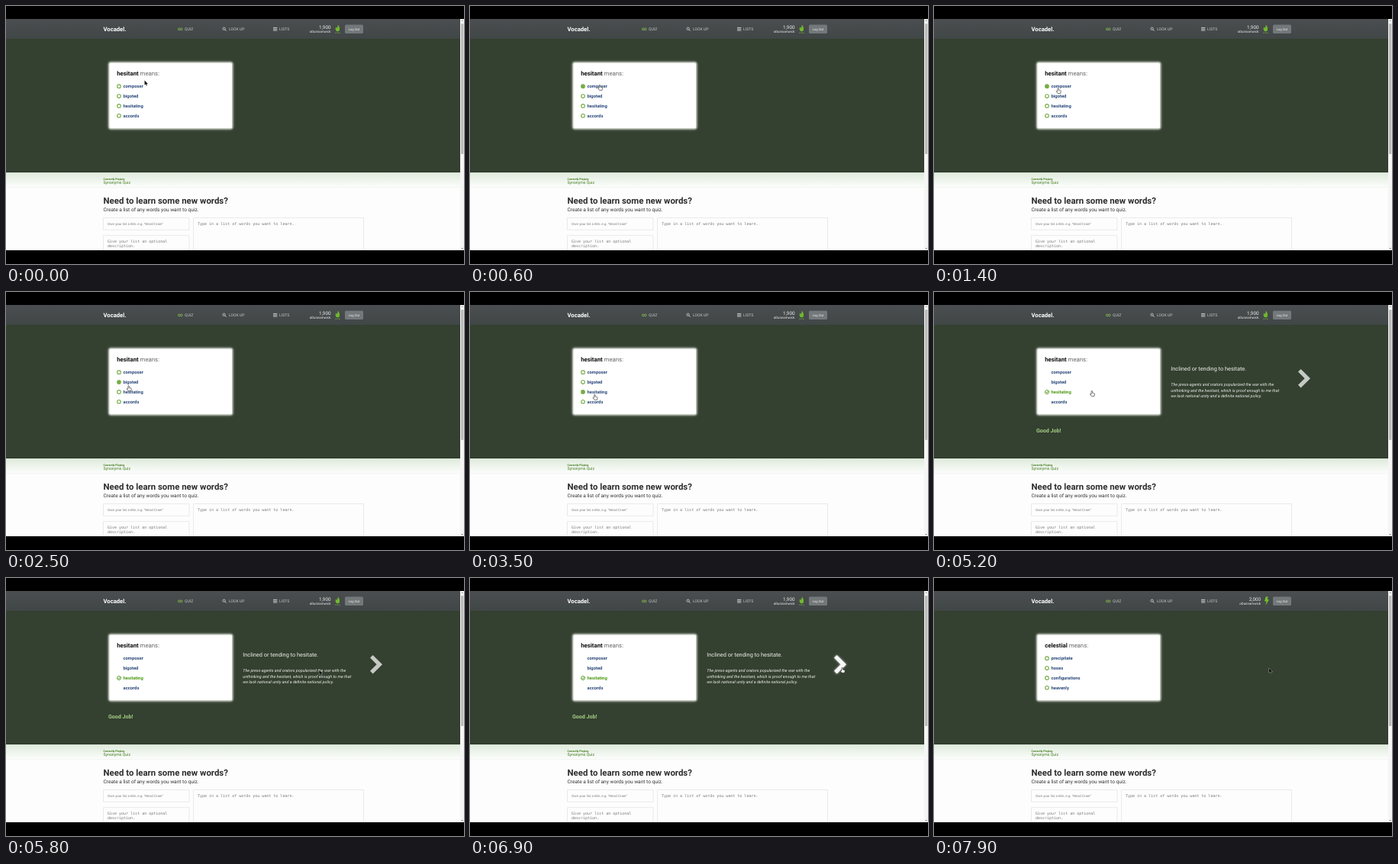
An HTML page for the animation above (8 s loop, 600x338 px).

```html
<!DOCTYPE html>
<html lang="en">
<head>
<meta charset="utf-8">
<title>Vocabulary quiz</title>
<style>
  html, body { margin: 0; height: 100%; overflow: hidden; background: #000; }
  svg { display: block; width: 100vw; height: 100vh; font-family: Roboto, sans-serif; text-rendering: geometricPrecision; }
  .bold { font-weight: 700; }
  .nav { font-size: 5.1px; fill: #c4c8c6; }
  .end { text-anchor: end; }
  .mono { font: 5px "DejaVu Sans Mono", monospace; fill: #777; }
  .line { fill: none; stroke: #dcdedc; stroke-width: .6; }
  .option { font-size: 5.85px; font-weight: 700; }
</style>
</head>
<body>
<svg viewBox="0 0 600 338">
  <defs>
    <linearGradient id="bar" x2="0" y2="1"><stop stop-color="#4a4e50"/><stop offset="1" stop-color="#414647"/></linearGradient>
    <linearGradient id="mist" x2="0" y2="1"><stop stop-color="#dfeadb"/><stop offset="1" stop-color="#fdfefd"/></linearGradient>
    <filter id="glow" x="-50%" y="-50%" width="200%" height="200%"><feDropShadow dx="0" dy="0" stdDeviation="1.6" flood-color="#fff" flood-opacity=".75"/></filter>
  </defs>

  <rect y="17" width="600" height="303" fill="#fdfdfd"/>
  <rect y="17" width="595" height="26" fill="url(#bar)"/>
  <rect y="43" width="595" height="175" fill="#344030"/>
  <rect y="218" width="595" height="20" fill="url(#mist)"/>
  <path d="M0 217.6H595" stroke="#2a3427" stroke-width=".8"/>
  <path d="M0 237.8H595" stroke="#e6ebe4" stroke-width=".6"/>
  <rect x="595" y="17" width="5" height="303" fill="#f5f5f5"/>
  <rect x="596" y="23" width="3.4" height="171" rx="1" fill="#b9bbb9"/>
  <path d="M596.4 19.8L597.7 18.4 599 19.8zM596.4 317L597.7 318.4 599 317z" fill="#777"/>

  <text class="bold" x="127.5" y="32.6" font-size="7.66" fill="#fff">Vocadel.</text>
  <g fill="none" stroke="#7fae4c" stroke-width="1"><circle cx="226.8" cy="30.4" r="1.4"/><circle cx="229.8" cy="30.4" r="1.4"/></g>
  <g fill="none" stroke="#c4c8c6" stroke-width="1">
    <circle cx="285.6" cy="29.7" r="1.6"/><path d="M286.8 30.9L288.6 32.7"/>
    <path d="M350 28.4H355.3M350 30.2H355.3M350 32H355.3"/>
  </g>
  <text class="nav" x="234" y="32.1">QUIZ</text>
  <text class="nav" x="292" y="32.1">LOOK UP</text>
  <text class="nav" x="358" y="32.1">LISTS</text>
  <g id="account" fill="#f0f2f0">
    <text id="score" class="end" x="425.5" y="30.4" font-size="6.3"></text>
    <text class="end" x="425.5" y="35.3" font-size="4.4">oDunnamwick</text>
  </g>
  <g id="flame" fill="#72b72f">
    <path d="M434.8 24.5Q437.8 28 436.9 32Q435.8 33.8 433 33Q430.6 30.5 432.4 27.5L433.2 29Q435 27.5 434.8 24.5z"/>
    <text x="434.3" y="35.8" font-size="2.6" text-anchor="middle">streak</text>
  </g>
  <path id="bolt" d="M434.6 24.6H437.6L436.8 28.2H439L434.4 35.8 435.5 30.6H433z" fill="#72c02a"/>
  <rect x="444" y="24.6" width="24" height="11.4" rx="1.6" fill="#73787a"/>
  <text x="456" y="31.8" font-size="4.16" fill="#eef0ee" text-anchor="middle">Log Out</text>

  <rect x="134.8" y="73.9" width="161.9" height="87" rx="2.4" fill="#fff" stroke="#aab3a6" stroke-width="1.2" filter="url(#glow)"/>
  <text x="145.2" y="91" font-size="7.8" fill="#666"><tspan id="word" class="bold" fill="#111"></tspan> means:</text>
  <g id="options"></g>

  <g id="answer">
    <circle cx="148" cy="131" r="2.5" fill="none" stroke="#4f9717" stroke-width=".9"/>
    <path d="M146.7 130.9L147.8 132.1 149.6 129.8" fill="none" stroke="#4f9717" stroke-width=".9"/>
    <text class="bold" x="134" y="184" font-size="7.1" fill="#a6cf86">Good Job!</text>
    <g fill="#eef1ec">
      <text x="310.3" y="102.8" font-size="7.37">Inclined or tending to hesitate.</text>
      <g font-size="5.4" font-style="italic">
        <text x="310.3" y="122.8">The press-agents and orators popularized the war with the</text>
        <text x="310.3" y="130.6">unthinking and the hesitant, which is proof enough to me that</text>
        <text x="310.3" y="138.4">we lack national unity and a definite national policy.</text>
      </g>
    </g>
    <path id="next" d="M477 104.6L480.6 101 493 113.2 480.6 125.4 477 121.8 485.6 113.2z"/>
  </g>

  <text class="bold" x="127.5" y="227.6" font-size="3.6" fill="#3f7a1c">Currently Playing</text>
  <text x="127.5" y="233" font-size="5.2" fill="#3f7a1c">Synonyms Quiz</text>
  <text class="bold" x="127.5" y="259.2" font-size="11.43" fill="#2d2f2d">Need to learn some new words?</text>
  <text x="127.5" y="269.4" font-size="6.59" fill="#333">Create a list of any words you want to quiz.</text>
  <path class="line" d="M127.5 277.5H240V293.3H127.5zM127.5 320V300.6H240V320M245.5 320V277.5H468.5V320"/>
  <text x="133" y="287" font-size="4.37" fill="#777" font-family="Liberation Sans, sans-serif">Give your list a title, e.g. "Word Cram"</text>
  <text class="mono" x="251" y="287.3">Type in a list of words you want to learn.</text>
  <text class="mono" x="133" y="310.4">Give your list an optional</text>
  <text class="mono" x="133" y="316.2">description.</text>
  <rect y="320" width="600" height="18"/>

  <g id="cursor" stroke-width=".6" stroke-linejoin="round">
    <path id="arrow" d="M0 0V6L1.4 4.8 2.3 6.8 3.3 6.4 2.4 4.5H4.2z" fill="#111" stroke="#e4e6e4" paint-order="stroke"/>
    <path id="hand" d="M-.7 .6a.7 .7 0 0 1 1.4 0V2.6l2 .4q1 .2 .9 1.2L3.2 6.8H-.6L-2.4 4.2q0-1 1.7-.1z" fill="#fff" stroke="#222"/>
  </g>
</svg>
<script>
const LOOP = 8000, ANSWERED = 3700, NEXT_WORD = 7900, ROW = 12.85;
const el = id => document.getElementById(id);
const show = (id, on) => el(id).style.display = on ? '' : 'none';

const quizzes = [
  { word: 'hesitant', score: '1,900', options: ['composer', 'bigoted', 'hesitating', 'accords'] },
  { word: 'celestial', score: '2,000', options: ['precipitate', 'hoses', 'configurations', 'heavenly'] }
];

// Pointer waypoints: time, x, y
const path = [
  [0, 181.6, 97.5], [900, 164, 106.5], [1400, 162.6, 107.6], [1800, 161.4, 110], [2100, 160.6, 113],
  [2500, 160.6, 122.8], [2900, 163.4, 134.4], [4700, 163.4, 134.4], [5200, 206.8, 129.6],
  [5600, 330, 122], [6100, 531, 118], [6500, 487.6, 117.4], [7800, 487.6, 117.4], [NEXT_WORD, 439, 118]
];

el('options').innerHTML = quizzes[0].options.map((_, i) => {
  const y = 105.2 + i * ROW;
  return `<circle cx="148" cy="${y}" r="2.3" stroke="#76ad45" stroke-width="1.1"/>
    <text class="option" x="153.5" y="${y + 2.2}"></text>`;
}).join('');
const circles = document.querySelectorAll('#options circle');
const labels = document.querySelectorAll('#options text');

function pointerAt(t) {
  const i = path.findIndex(p => p[0] > t);
  if (i < 0) return path.at(-1).slice(1);
  const [t0, x0, y0] = path[i - 1], [t1, x1, y1] = path[i];
  const k = (t - t0) / (t1 - t0);
  return [x0 + (x1 - x0) * k, y0 + (y1 - y0) * k];
}

function draw(t) {
  const second = t >= NEXT_WORD, answered = t >= ANSWERED && !second;
  const quiz = quizzes[+second];
  const [x, y] = pointerAt(t);
  const row = x > 140 && x < 292 && y > 99 ? Math.floor((y - 99) / ROW) : -1;
  const onNext = answered && x > 474 && x < 495;

  el('word').textContent = quiz.word;
  el('score').textContent = quiz.score;
  el('account').setAttribute('transform', `translate(${second ? 2.6 : 0} 0)`);
  show('flame', !second);
  show('bolt', second);

  quiz.options.forEach((text, i) => {
    labels[i].textContent = text;
    labels[i].setAttribute('fill', answered && i === 2 ? '#4f9a14' : '#2c4a7c');
    circles[i].style.display = answered ? 'none' : '';
    circles[i].setAttribute('fill', i === row ? '#76ad45' : '#fff');
  });

  show('answer', answered);
  el('answer').style.opacity = Math.min(1, (t - ANSWERED + 100) / 300);
  el('next').setAttribute('fill', onNext ? '#f6f7f6' : '#c6cac4');
  el('next').setAttribute('filter', onNext ? 'url(#glow)' : 'none');

  const link = row >= 0 || onNext;
  show('hand', link);
  show('arrow', !link);
  el('cursor').setAttribute('transform', `translate(${x} ${y})`);
}

const start = performance.now();
function tick() {
  const t = (performance.now() - start) % LOOP;
  draw(Math.floor(t / 100) * 100);
  requestAnimationFrame(tick);
}
tick();
</script>
</body>
</html>
```
